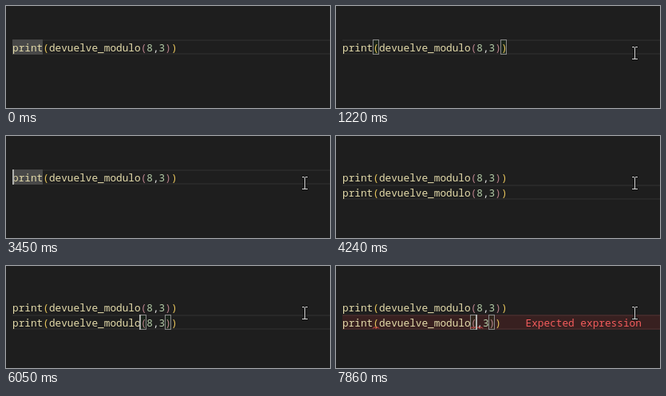
Recreate the animation shown at these times as an HTML page with a canvas. Size 406 px wide and 128 px high, loop 7990 ms.

```html
<!DOCTYPE html>
<html lang="es">
<head>
<meta charset="utf-8">
<style>
  html, body { margin: 0; height: 100%; overflow: hidden; background: #1e1e1e; }
  canvas { display: block; }
</style>
</head>
<body>
<canvas width="406" height="128"></canvas>
<script>
const ctx = document.querySelector('canvas').getContext('2d');
const LOOP = 7990, LEFT = 8, TOP = 42, ROW = 19, CHAR = 7.65;
const BLINK = 530, WORD_DELAY = 250, BRACKET_DELAY = 50, KEY_REPEAT = 33;
const COPIED = 3710, DELETED = 7460, SQUIGGLED = 7790, REPORTED = 7860;
const CODE = 'print(devuelve_modulo(8,3))';

// Every caret action restarts the blinking; edits do not highlight words.
const actions = [];
const act = (at, row, col, edit = false) => actions.push({ at, row, col, edit });
act(-BLINK, 0, 0);
act(690, 0, CODE.length);
act(1910, 0, 0);
act(COPIED, 1, 0, true);
act(4830, 1, 1);
for (let col = 2; col <= 21; col++) act(5370 + (col - 2) * KEY_REPEAT, 1, col);
act(6270, 1, 22);
act(DELETED, 1, 22, true);

const colX = col => LEFT + col * CHAR;
const rowY = row => TOP + row * ROW;
const clamp = k => Math.max(0, Math.min(1, k));
const ease = k => k * k * (3 - 2 * k);

function rect(x, y, w, h, color) {
  ctx.fillStyle = color;
  ctx.fillRect(x, y, w, h);
}

function write(text, row, col, color) {
  ctx.fillStyle = color;
  ctx.fillText(text, colX(col), rowY(row) + 15);
}

function bracketPairs(text) {
  return [
    [text.indexOf('('), text.lastIndexOf(')')],
    [text.lastIndexOf('('), text.indexOf(')')]
  ];
}

function tokenColor(token, index, outer) {
  if (/[a-z]/.test(token)) return '#e4dbaa';
  if (/\d/.test(token)) return '#b5cea8';
  if (token === ',') return '#d4d4d4';
  return outer.includes(index) ? '#e8c55c' : '#b8808a';
}

function codeLine(text, row) {
  const [outer] = bracketPairs(text);
  for (const { 0: token, index } of text.matchAll(/[a-z_]+|./g))
    write(token, row, index, tokenColor(token, index, outer));
}

function highlightWord(lines, col) {
  lines.forEach((text, row) => {
    for (const { 0: word, index } of text.matchAll(/[a-z_]+/g)) {
      const end = index + word.length;
      if (col < index || col > end) continue;
      const x = Math.floor(colX(index));
      rect(x, rowY(row), Math.floor(colX(end)) - x, ROW, '#484848');
    }
  });
}

function boxBrackets(text, row, col) {
  const pair = bracketPairs(text).find(p => p.includes(col) || p.includes(col - 1)) || [];
  ctx.strokeStyle = '#888';
  ctx.lineWidth = 1;
  for (const c of pair) {
    const x = Math.floor(colX(c)), y = rowY(row);
    rect(x, y, 8, ROW, 'rgba(0,100,0,.1)');
    ctx.strokeRect(x + .5, y + .5, 7, ROW - 1);
  }
}

function squiggle(row, col) {
  const x = colX(col), y = rowY(row) + 16.5;
  ctx.strokeStyle = '#f14c4c';
  ctx.lineWidth = 1;
  ctx.beginPath();
  for (let i = 0; i <= 4; i++) ctx.lineTo(x + i * CHAR / 4, y + (i % 2 ? -1 : 1));
  ctx.stroke();
}

function pointer(t) {
  const enter = ease(clamp((t - 70) / 200));
  const leave = ease(clamp((t - 540) / 480));
  const x = Math.round(311 + 23 * enter + 40 * leave);
  const y = Math.round(100 - 51 * enter + 10 * leave - 16 * Math.sin(Math.PI * leave));
  for (const [grow, color] of [[1, '#111'], [0, '#d8d8d8']]) {
    const bar = (dx, dy, w, h) => rect(x + dx - grow, y + dy - grow, w + 2 * grow, h + 2 * grow, color);
    bar(0, -7, 1, 15);
    for (const dy of [-8, 7]) {
      bar(-3, dy, 3, 1);
      bar(1, dy, 3, 1);
    }
  }
}

function draw(t) {
  const { at, row, col, edit } = actions.findLast(a => a.at <= t);
  const idle = t - at;
  const y = rowY(row);
  const lines = [CODE];
  if (t >= COPIED) lines.push(t < DELETED ? CODE : CODE.replace('8', ''));

  rect(0, 0, 406, 128, '#1e1e1e');
  rect(LEFT, y, 398, 2, '#282828');
  rect(LEFT, y + ROW - 2, 398, 2, '#282828');
  if (t >= REPORTED) rect(LEFT, y, 398, ROW, 'rgba(228,50,50,.13)');

  if (idle >= WORD_DELAY && !edit) highlightWord(lines, col);
  if (idle >= BRACKET_DELAY) boxBrackets(lines[row], row, col);

  ctx.font = '12.75px "Noto Sans Mono", monospace';
  lines.forEach(codeLine);
  if (t >= SQUIGGLED) [5, 21, 22].forEach(c => squiggle(1, c));
  if (t >= REPORTED) write('Expected expression', 1, 30, '#f45c5c');

  const caretOn = Math.floor(idle / BLINK) % 2 === 0;
  if (caretOn) rect(Math.max(LEFT, Math.floor(colX(col)) - 1), y, 2, ROW, '#aeafad');
  if (t >= 70) pointer(t);
}

const start = performance.now();
function tick() {
  draw((performance.now() - start) % LOOP);
  requestAnimationFrame(tick);
}
tick();
</script>
</body>
</html>
```
